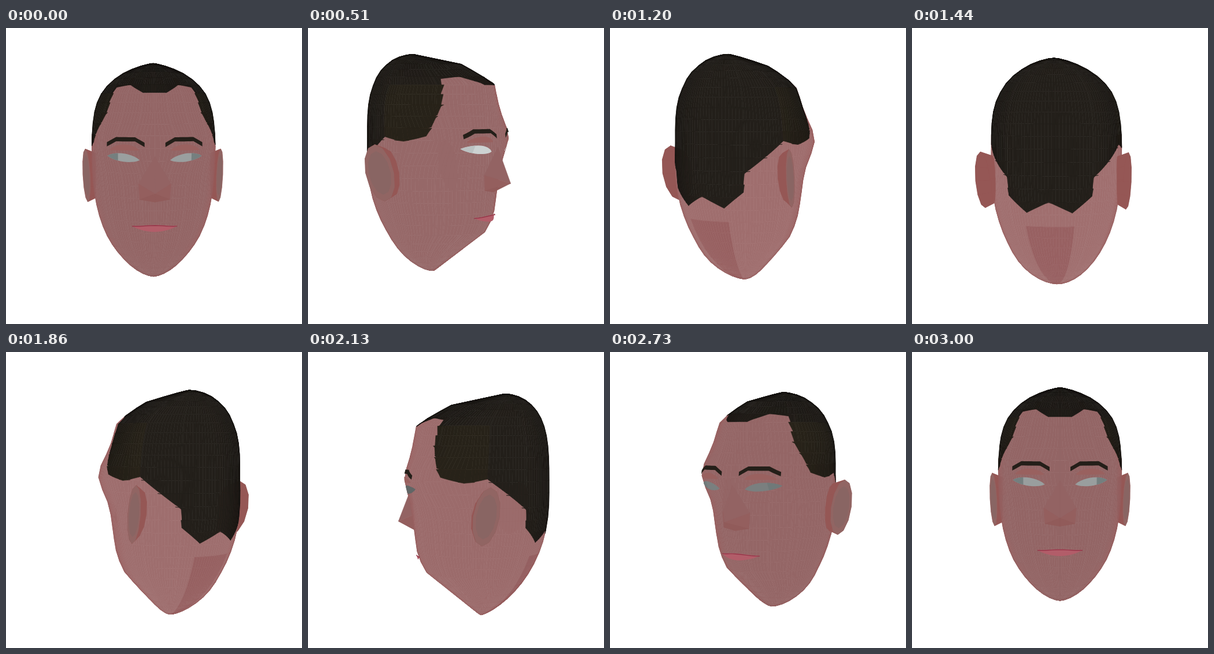
Recreate the animation shown at these times as an HTML page with a canvas. Size 512x512 px, loop 3.03 s.

```html
<!DOCTYPE html>
<html lang="en">
<head>
<meta charset="utf-8">
<title>Turning head</title>
<style>
  html, body { margin: 0; width: 100%; height: 100%; overflow: hidden; background: #fff; }
  canvas { display: block; width: 512px; height: 512px; }
</style>
</head>
<body>
<canvas id="stage" width="512" height="512"></canvas>
<script>
const ctx = document.getElementById('stage').getContext('2d');
const RAD = Math.PI / 180;
const LOOP = 3030, STEP = 30, START = 1.1, TURN = 3.589;
const CAMERA = 1800, PITCH = 0.06, BOB = 16;
const TOP = -189, WIDEST = -20, BOTTOM = 190;

// Key points of the face in profile: y, z
const PROFILE = [[TOP, -85], [-170, 10], [-137, 70], [-45, 86], [82, 69], [115, 57], [BOTTOM, -44]];

// Key points of the lower edge of the hair: angle from the front, y
const HAIRLINE = [
  [0, -134], [16, -134], [34, -148], [52, -144], [54, -98], [58, -84],
  [72, -49], [87, -40], [104, -47], [140, 4], [141, 34], [159, 60], [180, 42]
];

const mix = (a, b, t) => a + (b - a) * t;
const blend = (a, b, t) => a.map((v, i) => mix(v, b[i], t));
const rgb = c => `rgb(${c.map(Math.round)})`;
const power = (v, e) => Math.sign(v) * Math.abs(v) ** e;

// Piecewise linear value of a list of [key, value]
function lookup(points, key) {
  let i = 1;
  while (i < points.length - 1 && points[i][0] < key) i++;
  const [k0, v0] = points[i - 1], [k1, v1] = points[i];
  return mix(v0, v1, Math.min(1, Math.max(0, (key - k0) / (k1 - k0))));
}

// Horizontal section of the head; the brow is squarer than the rest
function section(y) {
  const upper = y < WIDEST;
  const s = (y - WIDEST) / ((upper ? TOP : BOTTOM) - WIDEST);
  const room = Math.max(0, 1 - s ** (upper ? 4 : 2.3));
  const front = lookup(PROFILE, y);
  const back = upper ? -85 - 76 * room ** 0.5 : -44 - 117 * room ** 0.75;
  return {
    width: 109 * room ** (upper ? 0.7 : 0.58),
    front, back,
    middle: (front + back) / 2 - 15 * Math.min(1, room * 3),
    square: 1.65 + 0.8 * Math.exp(-(((y + 45) / 35) ** 2))
  };
}

function surface(u, y) {
  const { width, front, back, middle, square } = section(y);
  const s = Math.sin(u * RAD), c = Math.cos(u * RAD);
  const e = c > 0 ? 2 / square : 1;
  const depth = c > 0 ? front - middle : middle - back;
  return [width * power(s, e), y, middle + depth * power(c, e)];
}

// Point on the face at a frontal position, with its outward direction
function onFace([x, y], lift) {
  const { width, square } = section(y);
  const a = Math.asin(power(Math.max(-1, Math.min(1, x / width)), square / 2));
  const [px, , pz] = surface(a / RAD, y);
  const nx = Math.sin(a), nz = Math.cos(a);
  return { p: [px + nx * lift, y, pz + nz * lift], nx, nz };
}

function normal([a, b, c, d]) {
  const p = c.map((v, i) => v - a[i]), q = d.map((v, i) => v - b[i]);
  const n = [p[1] * q[2] - p[2] * q[1], p[2] * q[0] - p[0] * q[2], p[0] * q[1] - p[1] * q[0]];
  const len = Math.hypot(...n) || 1;
  return n.map(v => v / len);
}

const skinTone = (u, y) => u > 155 && y > 85 ? [-8, -14, -13] : [0, 0, 0];
const hairTone = (u, y) => u < 104 && y > -138 ? [39, 34, 25] : [35, 31, 26];

const skin = [], hair = [];

function buildHead() {
  const half = HAIRLINE.map(p => p[0]);
  for (let u = 3; u < 180; u += 3) if (!half.includes(u)) half.push(u);
  half.sort((a, b) => a - b);
  const cols = [...half.slice(1).reverse().map(u => -u), ...half];
  const rows = Array.from({ length: 29 }, (_, i) =>
    mix(TOP, BOTTOM, (1 - Math.cos(i / 28 * Math.PI)) / 2));
  const add = (list, u0, u1, top, low0, low1, color) => {
    const pts = [surface(u0, top), surface(u1, top), surface(u1, low1), surface(u0, low0)];
    list.push({ pts, n: normal(pts), color });
  };
  for (let i = 1; i < cols.length; i++) {
    const u0 = cols[i - 1], u1 = cols[i], u = Math.abs(u0 + u1) / 2;
    const h0 = lookup(HAIRLINE, Math.abs(u0)), h1 = lookup(HAIRLINE, Math.abs(u1));
    for (let j = 1; j < rows.length; j++) {
      const top = rows[j - 1], low = rows[j], mid = (top + low) / 2;
      const cut = h => Math.max(top, Math.min(low, h));
      if (low > Math.min(h0, h1)) add(skin, u0, u1, top, low, low, skinTone(u, mid));
      if (top < Math.max(h0, h1)) add(hair, u0, u1, top, cut(h0), cut(h1), hairTone(u, mid));
    }
  }
}

let sin = 0, cos = 1;

function project([x, y, z]) {
  const depth = z * cos - x * sin, k = CAMERA / (CAMERA - depth);
  return [256 + (x * cos + z * sin) * k, 247 + (y + PITCH * depth) * k - BOB * sin];
}

function area(pts) {
  return pts.reduce((sum, p, i) => {
    const q = pts[(i + 1) % pts.length];
    return sum + p[0] * q[1] - q[0] * p[1];
  }, 0);
}

function trace(pts) {
  ctx.beginPath();
  pts.forEach(p => ctx.lineTo(...p));
}

function fill(pts, color, seam = 0.6) {
  trace(pts);
  ctx.closePath();
  ctx.fillStyle = ctx.strokeStyle = rgb(color);
  ctx.fill();
  if (seam) {
    ctx.lineWidth = seam;
    ctx.stroke();
  }
}

function drawFaces(list, edge, base, reach) {
  for (const { pts, n, color } of list) {
    const flat = pts.map(project);
    if (area(flat) <= 0) continue;
    const facing = Math.max(0, n[2] * cos - n[0] * sin);
    const lit = color.map((v, i) => v + base[i]);
    fill(flat, blend(edge, lit, Math.min(1, 0.2 + facing * reach)));
  }
}

// Outline between an upper and a lower curve, both functions of 0..1
function band(x0, x1, upper, lower) {
  const row = f => Array.from({ length: 13 }, (_, i) => [mix(x0, x1, i / 12), f(i / 12)]);
  return [...row(upper), ...row(lower).reverse()];
}

const arc = t => Math.sin(Math.PI * t) ** 0.7;
const arch = t => -48 - 9 * Math.min(1, 4 * t, 4 * (1 - t));
const eyeLine = t => mix(-22, -28, t);
const EYE = band(25, 79, t => eyeLine(t) - 8 * arc(t), t => eyeLine(t) + 6 * arc(t));
const EYE_CORNER = EYE.filter(([x]) => x > 57);
const BROW = band(17, 79, t => arch(t) - 3, t => arch(t) + 4);
const LID = band(27, 74, t => -40 - 8 * arc(t), () => -38);
const lipTop = t => 89 - 3 * Math.sin(Math.PI * t) ** 2;
const LIPS = band(-36, 36, lipTop, t => 89 + 9 * arc(t));
const LIP_LINE = band(-36, 36, t => lipTop(t) + 1, () => 0).slice(0, 13);

// Keep only the points of a flat feature that face the viewer
function visible(shape, side, lift) {
  return shape
    .map(([x, y]) => onFace([x * side, y], lift))
    .filter(f => f.nz * cos - f.nx * sin > 0)
    .map(f => project(f.p));
}

function drawFeature(shape, side, lift, color) {
  const pts = visible(shape, side, lift);
  if (pts.length > 2) fill(pts, color, 0);
}

function drawFeatures() {
  const shine = 158 + 58 * sin;
  const white = [shine - 5, shine, shine];
  for (const side of [-1, 1]) {
    drawFeature(LID, side, 0.5, [153, 97, 95]);
    drawFeature(EYE, side, 0.5, white);
    drawFeature(EYE_CORNER, side, 0.5, blend(white, [104, 116, 116], 0.75 * cos * cos));
    drawFeature(BROW, side, 1.5, [36, 31, 25]);
  }
  drawFeature(LIPS, 1, 4, [178, 93, 105]);
  const line = visible(LIP_LINE, 1, 4);
  if (line.length > 1) {
    trace(line);
    ctx.strokeStyle = 'rgb(146,48,68)';
    ctx.lineWidth = 1.2;
    ctx.stroke();
  }
}

function drawNose() {
  const bridge = [0, -28, 80], tip = [0, 32, 104], base = [0, 48, 72];
  for (const side of [-1, 1]) {
    const wingTop = [27 * side, 18, 68], wingLow = [25 * side, 44, 68];
    const parts = [
      [[bridge, wingTop, tip], [147, 99, 99]],
      [[wingTop, wingLow, tip], [148, 95, 94]],
      [[tip, wingLow, base], [145, 91, 90]]
    ];
    for (const [pts, color] of parts) {
      const flat = pts.map(project);
      if (area(flat) * side > 0) fill(flat, color);
    }
  }
}

// Tilted oval that leans away from the head towards the back
function earRing(side, size, x) {
  return Array.from({ length: 12 }, (_, i) => {
    const a = i * 30 * RAD;
    const c = Math.cos(a) * size, s = Math.sin(a) * size;
    const z = -80 - 23 * c - 8 * s;
    return project([side * (x || 112 - (z + 55) * 0.33), 13 - 47 * s, z + (x ? 8 : 0)]);
  });
}

function drawEar(side) {
  const rim = earRing(side, 1), root = earRing(side, 0.85, 104);
  const strip = () => rim.forEach((p, i) => {
    const j = (i + 1) % rim.length;
    fill([p, rim[j], root[j], root[i]], [149, 87, 85]);
  });
  const outside = 0.33 * cos - side * sin > 0;
  if (outside) strip();
  fill(rim, [145, 101, 99]);
  if (outside) fill(earRing(side, 0.76), [137, 101, 99]);
  else strip();
}

function draw(now) {
  const angle = (START + TURN * Math.floor(now % LOOP / STEP)) * RAD;
  sin = Math.sin(angle);
  cos = Math.cos(angle);
  ctx.fillStyle = '#fff';
  ctx.fillRect(0, 0, 512, 512);
  const near = side => -side * sin - 0.3 * cos > 0;
  const ears = [-1, 1];
  ears.filter(e => !near(e)).forEach(drawEar);
  if (cos <= 0) drawNose();
  const tone = blend([147, 101, 101], [160, 111, 111], (1 - cos) / 2);
  drawFaces(skin, [150, 88, 88], tone, 1.8);
  drawFaces(hair, [16, 14, 12], [0, 0, 0], 1);
  drawFeatures();
  if (cos > 0) drawNose();
  ears.filter(near).forEach(drawEar);
}

function tick() {
  draw(performance.now());
  requestAnimationFrame(tick);
}

ctx.lineJoin = 'round';
buildHead();
tick();
</script>
</body>
</html>
```
